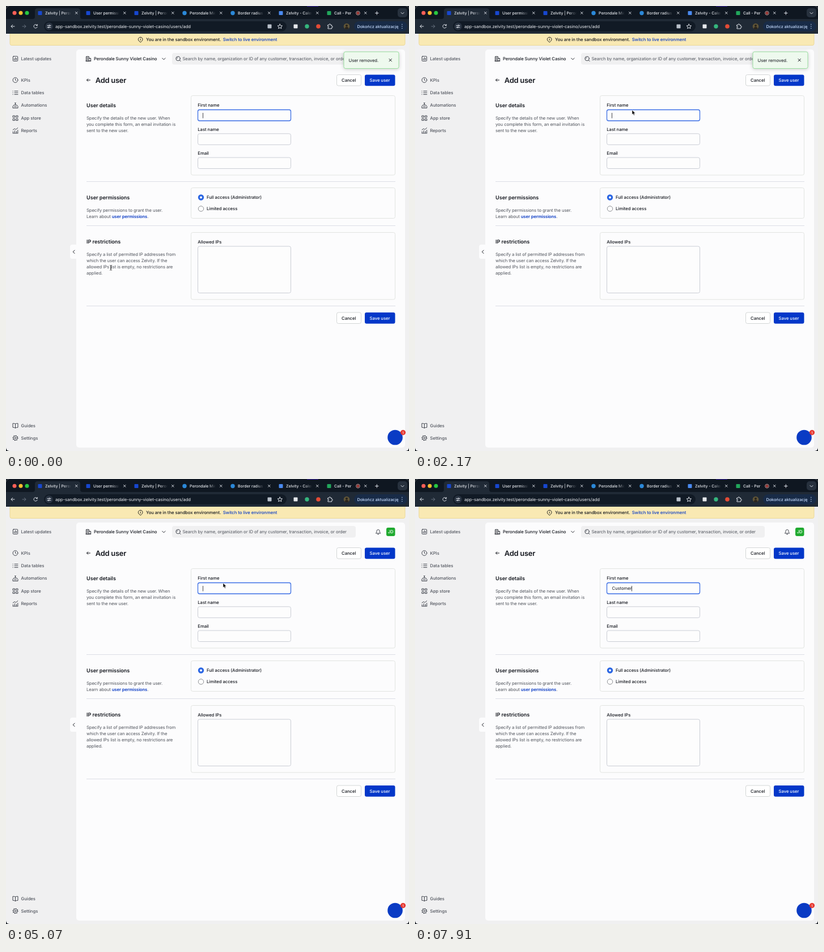
An HTML page that plays this animation: 711x787 px, repeating every 8 s.

```html
<!DOCTYPE html>
<html lang="en">
<head>
<meta charset="utf-8">
<title>Add user</title>
<style>
  html, body { margin: 0; width: 100%; height: 100%; overflow: hidden; background: #1b2027; }
  svg { display: block; width: 711px; height: 787px; }
  text {
    font: 500 7.7px Inter, sans-serif; letter-spacing: -.05px; fill: #14171e;
    transform: translateY(.364em); text-rendering: geometricPrecision; white-space: pre;
  }
  .body { font-weight: 400; letter-spacing: -.09px; fill: #50545c; }
  .nav { fill: #50545d; }
  .section { font-size: 9.1px; font-weight: 600; letter-spacing: -.03px; }
  .title { font-size: 12.9px; font-weight: 600; letter-spacing: -.22px; }
  .link { fill: #0a3bc4; }
  .bold { font-weight: 600; }
  .tab { font-size: 7px; fill: url(#fade); }
  .url { font-size: 7.65px; font-weight: 400; fill: #eceef2; }
  .white { fill: #fff; }
  .middle { text-anchor: middle; }
  .card { fill: none; stroke: #e2e4e1; }
  .input { fill: #fdfdfd; stroke: #cacdd5; }
  .rule { stroke: #dcdee6; }
  .icon { fill: none; stroke: #3f434c; stroke-width: 1; stroke-linecap: round; stroke-linejoin: round; }
  .light { stroke: #dfe3ea; }
  #toast rect { filter: drop-shadow(0 1px 3px #0003); }
</style>
</head>
<body>
<svg viewBox="0 0 711 787">
  <defs>
    <linearGradient id="fade" gradientUnits="userSpaceOnUse" x1="101" x2="115">
      <stop stop-color="#e6e9ee"/><stop offset="1" stop-color="#e6e9ee" stop-opacity="0"/>
    </linearGradient>
    <clipPath id="window"><rect width="711" height="787" rx="6"/></clipPath>
  </defs>

  <g clip-path="url(#window)">
    <rect width="711" height="787" fill="#f0f0f1"/>
    <rect x="7" y="45" width="697" height="24.500" rx="3" fill="#f9e9b3" stroke="#ecd998"/>

    <!-- Browser chrome -->
    <rect width="711" height="49" fill="#0f1721"/>
    <rect x="531" width="20" height="1" fill="#35209a"/>
    <rect y="23" width="711" height="26" fill="#202a36"/>
    <path d="M47 23q4 0 4-4V9q0-5 5-5h70q5 0 5 5v10q0 4 4 4z" fill="#202a36"/>
    <circle cx="15" cy="12.300" r="3.500" fill="#fe5f57"/>
    <circle cx="26" cy="12.300" r="3.500" fill="#febc2e"/>
    <circle cx="37" cy="12.300" r="3.500" fill="#28c840"/>
    <g id="tabs"></g>
    <circle cx="621" cy="12.500" r="3.300" fill="none" stroke="#e9a5a0"/>
    <circle cx="621" cy="12.500" r="1.700" fill="#e5483f"/>
    <rect x="691" y="4" width="17" height="16" rx="5" fill="#27313e"/>
    <path class="icon light" d="M651.500 12.500h5.600m-2.800-2.800v5.600M697 11.500l2.500 2.500 2.500-2.500"/>
    <path class="icon light" d="M15 36H9m2.700-2.800L9 36l2.700 2.800M55 34.300a3.200 3.200 0 1 0 .2 2.800M55.300 32.500v2h-2"/>
    <path class="icon" style="stroke:#67717e" d="M29 36h6m-2.700-2.800L35 36l-2.700 2.800"/>
    <rect x="67" y="27" width="428" height="18" rx="9" fill="#111a25"/>
    <circle cx="76" cy="36" r="6.800" fill="#283240"/>
    <path class="icon light" d="M73 34.500h2.500m3 0h.5M73 37.700h.5m3 0H79"/>
    <circle class="icon light" cx="76.800" cy="34.500" r="1"/><circle class="icon light" cx="75" cy="37.700" r="1"/>
    <text class="url" x="87" y="36">app-sandbox.zelvity.test/perondale-sunny-violet-casino/users/add</text>
    <rect x="461.500" y="32.500" width="7" height="7" rx="1" fill="#b9c0ca"/>
    <path class="icon light" d="M483.300 32l1.200 2.700 3 .3-2.300 2 .7 2.900-2.600-1.500-2.600 1.500.7-2.900-2.300-2 3-.3z"/>
    <rect x="507.500" y="32.500" width="7" height="7" rx="1" fill="#e5e8ec"/>
    <circle cx="531" cy="36" r="3.700" fill="#35b67d"/>
    <circle cx="551" cy="36" r="3.800" fill="#e34b35"/>
    <path class="icon light" d="M568 33.700h2q-.3-2 1.300-2t1.300 2h2v2q1.700-.2 1.700 1.200t-1.700 1.200v2H568v-2.200q1.500 0 1.500-1t-1.500-1z"/>
    <circle cx="601" cy="36" r="5.300" fill="#5f5437"/>
    <path d="M597.500 40q.5-3 3.500-3t3.500 3q-3.500 2.500-7 0z" fill="#28241d"/><circle cx="601" cy="34.700" r="2" fill="#28241d"/>
    <rect x="614" y="27" width="94" height="18" rx="9" fill="#182b47"/>
    <text x="619.500" y="36" style="fill:#c3d9fb;font-size:7.300px">Dokończ aktualizację</text>
    <path d="M698.800 32.500h.01m-.01 3.500h.01m-.01 3.500h.01" stroke="#c3d9fb" stroke-width="1.500" stroke-linecap="round"/>

    <!-- Sandbox banner -->
    <path class="icon" style="stroke:#2a2a25" d="M237.200 64l-2.300-1.800a3.900 3.900 0 1 1 4.600 0zM237.200 58.500v2.200m0-4v.1"/>
    <text x="247" y="59.500">You are in the sandbox environment.</text>
    <text class="link" x="382.700" y="59.500">Switch to live environment</text>

    <!-- Sidebar -->
    <g id="nav"></g>
    <g class="icon">
      <rect x="12.300" y="89" width="8.400" height="8.400" rx="1"/><path d="M14.500 95.300v-2m2 2v-4m2 4v-3"/>
      <circle cx="16.500" cy="131" r="4.400"/><path d="M16.500 128.500V131l1.500 1"/>
      <path d="M15 150.500h6m-6 3h6m-6 3h6m-9-6h.2m-.2 3h.2m-.2 3h.2"/>
      <path d="M12 180v-2.500l2-2.500h5l2 2.500v2.500zM16.500 175v-3.500m-1 0h2M14.500 178h4"/>
      <path d="M12.500 194h3v3h-3zm5.500 0h3v3h-3zm-5.500 5.500h3v3h-3zm5.500 0h3v3h-3z"/>
      <path d="M12.500 224.500v-2.500m3 2.500v-4m3 4v-3m2.300 3v-5m-8.500-.5l3-2 2 1.500 3.500-3M12 225h9"/>
      <path d="M16.500 746.500v-7.500q-1.500-1-4.500-.8v7q3 0 4.500 1.300 1.500-1.300 4.500-1.300v-7q-3-.2-4.500.8"/>
      <circle cx="16.500" cy="764" r="3.700"/><circle cx="16.500" cy="764" r="1.300"/>
      <circle cx="16.500" cy="764" r="4.400" stroke-width="1.300" stroke-dasharray="1.200 2.256" stroke-linecap="butt"/>
    </g>

    <!-- Main panel -->
    <rect x="124" y="77" width="580" height="704" rx="5" fill="#fcfcfd"/>
    <path d="M125 422h-8q-4 0-4 4v17q0 4 4 4h8z" fill="#fcfcfd"/>
    <path class="icon" style="stroke:#14171e" d="M121 432l-2.700 2.800 2.700 2.800"/>

    <g class="icon" style="stroke:#24272e">
      <path d="M141.500 97.300v-8h4.800v8zm4.800-4.800h3.200v4.800h-3.200M143.200 91.500h1.300m-1.300 2h1.300m-1.300 2h1.300M140.800 97.300h9"/>
      <path d="M275.700 92.200l2.700 2.700 2.700-2.700"/>
    </g>
    <text x="155" y="93.500">Perondale Sunny Violet Casino</text>
    <rect x="293" y="83" width="324" height="20.500" rx="4" fill="#f0f0f1"/>
    <circle class="icon" cx="303.500" cy="93" r="3.700"/><path class="icon" d="M306.200 95.700l2 2m-6.700-5.200q.5-1 1.500-1.200"/>
    <text class="body" x="311.500" y="93.500">Search by name, organization or ID of any customer, transaction, invoice, or order</text>
    <path class="icon" d="M652.700 95.800q1.300-.8 1.300-3.300 0-3 2.600-3t2.600 3q0 2.500 1.300 3.300zm2.800 1.900h2.200"/>
    <rect x="671" y="86" width="15.500" height="15" rx="3" fill="#20aa30"/>
    <text class="white middle" x="678.700" y="93.700">JD</text>

    <path class="icon" style="stroke:#14171e" d="M148.500 131h-6m2.300-2.300l-2.300 2.300 2.300 2.300"/>
    <text class="title" x="157.700" y="131.500">Add user</text>
    <g id="buttons"></g>

    <g id="sections"></g>
    <path class="rule" d="M142 310.500h545M142 388.500h545M142 530.500h545"/>

    <rect class="card" x="326.500" y="158.500" width="360" height="140.500" rx="3"/>
    <rect class="card" x="326.500" y="321.500" width="360" height="54" rx="3"/>
    <rect class="card" x="326.500" y="400.500" width="360" height="118.500" rx="3"/>
    <text x="338.300" y="175.500">First name</text>
    <text x="338.300" y="217.800">Last name</text>
    <text x="338.300" y="260">Email</text>
    <text x="338.300" y="417">Allowed IPs</text>
    <rect class="input" x="338.500" y="183.500" width="164" height="19.500" rx="3" style="stroke:#3b6ee5;stroke-width:1.300"/>
    <rect class="input" x="338.500" y="225.800" width="164" height="19.500" rx="3"/>
    <rect class="input" x="338.500" y="268" width="164" height="19.500" rx="3"/>
    <rect class="input" x="338.500" y="425" width="164" height="82.500" rx="3"/>
    <text id="typed" x="347.500" y="193.700" style="font-weight:400"></text>
    <rect id="caret" y="189" width=".8" height="9.500" fill="#14171e"/>

    <circle cx="344" cy="338.500" r="3.600" fill="#fff" stroke="#2b66e3" stroke-width="3.200"/>
    <circle cx="344" cy="358.500" r="4.700" fill="#fff" stroke="#8b8e92"/>
    <text x="354" y="338.500">Full access (Administrator)</text>
    <text x="354" y="358.500">Limited access</text>

    <circle cx="686.500" cy="763" r="13.300" fill="#0a3bc4"/>
    <circle cx="700.500" cy="754.300" r="4.600" fill="#e63b34"/>
    <text class="white middle" x="700.400" y="754.500" style="font-size:6px">1</text>

    <g id="toast">
      <rect x="596" y="81" width="97" height="29.500" rx="3" fill="#eef9ee" stroke="#9adfa0"/>
      <text x="604.500" y="96" style="font-weight:400">User removed.</text>
      <path class="icon" style="stroke:#14171e" d="M676 93.500l4.400 4.400m0-4.400l-4.400 4.400"/>
    </g>

    <g id="pointer">
      <path id="beam" d="M-2-4.500q2 0 2 1.500v6q0 1.500-2 1.500M2-4.500q-2 0-2 1.500v6q0 1.500 2 1.500M-1 .8h2" fill="none" stroke="#111" stroke-width=".6"/>
      <path id="arrow" d="M0 0v8l1.800-1.600 1.200 2.900 1.500-.6-1.200-2.800h2.500z" fill="#000" stroke="#fff" stroke-width=".6"/>
    </g>
  </g>
</svg>

<script>
  const $ = id => document.getElementById(id);
  const text = (x, y, content, cls = "") => `<text class="${cls}" x="${x}" y="${y}">${content}</text>`;

  const square = fill => `<rect x="56.500" y="9" width="7" height="7" rx="1" fill="${fill}"/>`;
  const disc = fill => `<circle cx="60" cy="12.500" r="3.700" fill="${fill}"/>`;
  const tabs = [
    ["Zelvity | Peron", square("#1747cf")],
    ["User permissi", square("#1747cf")],
    ["Zelvity | Peron", square("#1747cf")],
    ["Perondale Mic", disc("#2b88d8")],
    ["Border radius", disc("#2b88d8")],
    ["Zelvity - Calen", square("#4a8af0")],
    ["Call - Per", square("#21a65b")],
  ];
  $("tabs").innerHTML = tabs.map(([title, mark], i) => `<g transform="translate(${i * 85})">
    ${mark}${text(69, 12.5, title, "tab")}
    <path class="icon light" d="M122.500 10.500l3.600 3.600m0-3.600l-3.600 3.600"/></g>`).join("");

  const nav = [[93.5, "Latest updates"], [131, "KPIs"], [153.5, "Data tables"], [175.7, "Automations"],
    [198, "App store"], [220, "Reports"], [742, "Guides"], [764, "Settings"]];
  $("nav").innerHTML = nav.map(([y, label]) => text(26.5, y, label, "nav")).join("");

  $("buttons").innerHTML = [131.5, 552].map(y => `
    <rect x="583.500" y="${y - 10}" width="43" height="19.500" rx="3" fill="#fff" stroke="#d3d6d6"/>
    <rect x="633" y="${y - 10}" width="53.500" height="19.800" rx="3" fill="#0337c9"/>
    ${text(604.7, y, "Cancel", "middle")}${text(659.5, y, "Save user", "middle white")}`).join("");

  const sections = [
    [175.8, "User details", "Specify the details of the new user. When",
      "you complete this form, an email invitation is", "sent to the new user."],
    [338.8, "User permissions", "Specify permissions to grant the user.",
      'Learn about <tspan class="link bold">user permissions</tspan>.'],
    [417, "IP restrictions", "Specify a list of permitted IP addresses from",
      "which the user can access Zelvity. If the", "allowed IPs list is empty, no restrictions are", "applied."],
  ];
  $("sections").innerHTML = sections.map(([y, title, ...lines]) => text(142, y, title, "section") +
    lines.map((line, i) => text(142, y + 22.2 + i * 11.1, line, "body")).join("")).join("");

  const LOOP = 8000, WORD = "Customer", TYPE_START = 5450, KEY_GAP = 290;
  const clamp = v => Math.min(1, Math.max(0, v));
  const ease = v => v * v * (3 - 2 * v);
  const show = (id, visible) => $(id).setAttribute("visibility", visible ? "inherit" : "hidden");

  function draw(t) {
    const typed = clamp((t - TYPE_START + KEY_GAP) / KEY_GAP / WORD.length) * WORD.length | 0;
    $("typed").textContent = WORD.slice(0, typed);
    $("caret").setAttribute("x", 347.2 + (typed ? $("typed").getComputedTextLength() : 0));
    const blink = t % 1080;
    show("caret", typed || blink < 40 || blink >= 580);

    $("toast").setAttribute("opacity", 1 - clamp((t - 2500) / 200));

    const move = ease(clamp((t - 350) / 600));
    const x = 185 + 198 * move, y = 463 - 279 * move;
    $("pointer").setAttribute("transform", `translate(${x} ${y})`);
    show("pointer", !typed);
    show("beam", !typed && y > 435);
    show("arrow", !typed && y <= 435);
  }

  const start = performance.now();
  function tick() {
    draw((performance.now() - start) % LOOP);
    requestAnimationFrame(tick);
  }
  tick();
</script>
</body>
</html>
```
